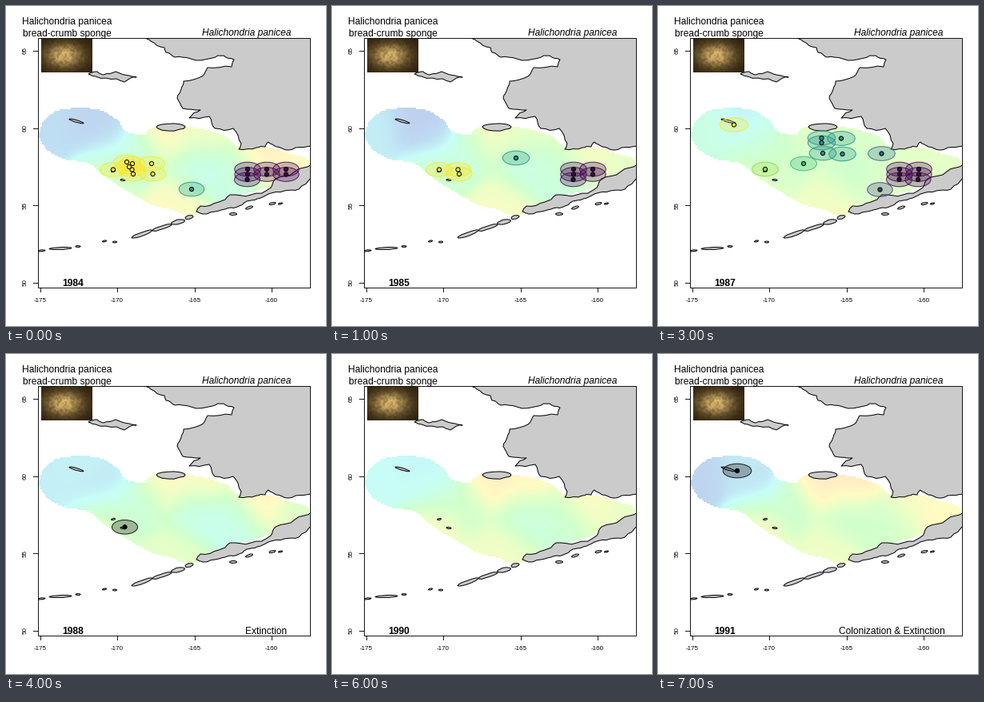
A matplotlib script that plays this animation: 400 by 400 pixels, repeating every 8 s.

```python
import matplotlib.pyplot as plt
import numpy as np
from matplotlib.animation import ArtistAnimation
from matplotlib.colors import to_rgb
from matplotlib.patches import Circle, Ellipse, Polygon, Rectangle
from matplotlib.path import Path

SIZE, PX = 400, 0.72  # stage in pixels, points per pixel
LEFT, TOP, RIGHT, BOTTOM = 39.5, 39.5, 380, 351.5
SCALE = 19.3  # pixels per degree

plt.rcParams["font.family"] = "Liberation Sans"
fig = plt.figure(figsize=(4, 4), dpi=100, facecolor="white")
ax = fig.add_axes([0, 0, 1, 1])
ax.axis("off")

# Coastlines in stage pixels; fine detail is added by roughen()
MAINLAND = [
    (172, 38), (181, 44), (198, 52), (200, 58), (211, 64), (231, 66),
    (258, 65), (272, 62), (285, 67), (282, 76), (252, 77), (245, 88),
    (222, 94), (219, 104), (214, 115), (221, 128), (243, 130), (229, 140),
    (254, 138), (261, 153), (284, 153), (294, 172), (291, 179), (313, 177),
    (324, 176), (328, 170), (338, 176), (352, 180), (362, 177), (382, 175),
    (382, 38),
]
PENINSULA = [
    (382, 198), (361, 207), (337, 216), (331, 227), (306, 236), (280, 236),
    (266, 245), (243, 250), (238, 257), (246, 260), (266, 256), (281, 252),
    (294, 249), (301, 244), (314, 241), (328, 235), (348, 231), (366, 229),
    (382, 214),
]
ST_LAWRENCE = [
    (103, 85), (114, 82), (122, 86), (137, 82), (154, 87), (163, 89),
    (148, 95), (138, 91), (112, 88),
]
# Small islands: centre, length, thickness and slope
ISLANDS = [
    (206, 151, 36, 10, 0), (88, 144, 18, 3, 0.28), (134, 206.5, 5, 2, -0.2),
    (146, 217.5, 6, 2, 0.1), (229, 264, 10, 5, -0.2), (215, 270, 17, 6, -0.2),
    (195, 277, 24, 5, -0.3), (170, 285, 26, 5, -0.35), (136, 295, 5, 2, 0),
    (123, 294, 5, 2, -0.2), (90, 300.5, 6, 2, 0), (68, 303, 28, 3, -0.04),
    (43, 306, 12, 2, -0.1), (333, 247, 8, 3, -0.2), (343, 247, 5, 2, -0.2),
    (304, 252, 9, 3, -0.3), (284, 260, 9, 3, 0),
]
SHELF = [
    (40, 162), (47, 142), (64, 130), (90, 127), (119, 129), (142, 144),
    (148, 157), (173, 163), (179, 152), (206, 150), (240, 152), (276, 162),
    (289, 177), (335, 177), (352, 184), (378, 190), (379, 202), (330, 227),
    (270, 242), (240, 260), (226, 263), (207, 254), (184, 250), (158, 235),
    (122, 213), (105, 196), (72, 192), (50, 180),
]

# Bottom temperature: stations, yearly levels and a pastel scale
STATIONS = np.array([
    (58, 150), (105, 138), (125, 170), (130, 208), (165, 188), (200, 163),
    (212, 245), (240, 200), (245, 163), (290, 207), (318, 183), (360, 197),
])
LEVELS = {
    1984: (1.1, 0.7, 0.9, 4.8, 3, 6.2, 5.9, 2.3, 5.6, 3, 7, 6),
    1986: (2, 0.2, 0.7, 3.6, 2.9, 5.2, 5.5, 2.9, 4.6, 3.6, 4.8, 4.2),
    1987: (2.9, 1.6, 2.9, 4.9, 4, 5, 5.5, 3.8, 4.6, 4.6, 5, 5),
    1988: (1.6, 1.7, 1.2, 4.9, 3.1, 6, 5, 2.2, 6, 2.5, 7, 4.6),
    1989: (3.4, 2.2, 2.9, 6, 4.2, 6.7, 5.5, 2.3, 5.7, 2.8, 6.4, 4.2),
    1991: (0.7, 1.5, 1, 5.9, 3.4, 7, 5.4, 3.7, 7.2, 4.1, 6, 6),
}
PASTELS = ["#bec5e8", "#bedcf3", "#c8fdf8", "#cbffe1", "#d1ffcd", "#e6ffc8",
           "#fffbc3", "#ffecc5", "#ffd6c6"]

# Clusters of sightings per year, from west to east
EAST = [(302, 204), (302, 210.5), (301.5, 217)]
NEAR = [(326, 204), (326, 210.5)]
PRIBILOF = [(134, 204.5), (157.5, 204.5), (159, 210)]
SIGHTINGS = {
    1984: [
        PRIBILOF + [(151, 195), (158, 197), (154, 201), (182, 197),
                    (183.5, 210)],
        [(232, 229)],
        EAST + NEAR + [(350, 204), (350, 210.5)],
    ],
    1985: [PRIBILOF, [(230, 190)], EAST + NEAR],
    1986: [
        [(74.5, 146), (75, 152)],
        [(182.5, 203.5)],
        [(230, 184), (230.5, 190.5)],
        [(278.5, 204), (278, 216), (277.5, 229)] + EAST,
        [(350, 204)],
    ],
    1987: [
        [(95, 148.5)],
        [(134, 204)],
        [(182, 197)],
        [(204.5, 165), (204.5, 171), (229, 165.5), (206, 184), (230.5, 185)],
        [(279.5, 184.5)],
        [(277.5, 229.5)],
        EAST + NEAR + [(325, 217)],
    ],
    1988: [[(148.5, 216.3)]],
    1991: [[(99, 146)]],
}
EVENTS = {1988: ("Extinction", 325), 1991: ("Colonization & Extinction", 292.5)}


def label(x, y, text, size=12, **style):
    style = {"ha": "center", "va": "baseline", **style}
    return ax.text(x, y, text, fontsize=size * PX, **style)


def line(xs, ys):
    ax.plot(xs, ys, color="black", lw=0.9 * PX, zorder=6)


def roughen(points, rng, rounds=2, amount=0.11):
    """Split every edge and push its middle sideways."""
    pts = np.array(points, float)
    for _ in range(rounds):
        edge = np.roll(pts, -1, axis=0) - pts
        side = np.column_stack([-edge[:, 1], edge[:, 0]])
        push = rng.uniform(-amount, amount, (len(pts), 1))
        push[np.hypot(*edge.T) > 60] = 0
        middle = pts + edge / 2 + side * push
        pts = np.stack([pts, middle], axis=1).reshape(-1, 2)
    return pts


def island(x, y, length, thick, slope, rng):
    a = np.linspace(0, 2 * np.pi, 14, endpoint=False)
    r = rng.uniform(0.75, 1.1, a.size)
    dx = length / 2 * np.cos(a)
    return np.column_stack([x + dx, y + slope * dx + thick / 2 * r * np.sin(a)])


def smooth(points, rounds=2):
    """Cut corners of a closed outline."""
    pts = np.array(points, float)
    for _ in range(rounds):
        nxt = np.roll(pts, -1, axis=0)
        pts = np.stack([0.8 * pts + 0.2 * nxt, 0.2 * pts + 0.8 * nxt], axis=1)
        pts = pts.reshape(-1, 2)
    return pts


def draw_land():
    rng = np.random.default_rng(7)
    frame = Rectangle((LEFT, TOP), RIGHT - LEFT, BOTTOM - TOP, fill=False,
                      ec="black", lw=0.9 * PX, zorder=6)
    ax.add_patch(frame)
    shapes = [roughen(p, rng) for p in (MAINLAND, PENINSULA, ST_LAWRENCE)]
    shapes += [island(*row, rng) for row in ISLANDS]
    for shape in shapes:
        land = Polygon(shape, fc="#cbcbcb", ec="black", lw=PX,
                       joinstyle="round", zorder=2)
        ax.add_patch(land)
        land.set_clip_path(frame)


def draw_axes():
    for lon in range(-175, -159, 5):
        x = 42.5 + (lon + 175) * SCALE
        line([x, x], [BOTTOM, BOTTOM + 5.5])
        label(x, 369.5, str(lon), 8)
    for lat in range(50, 66, 5):
        y = 152.5 + (60 - lat) * SCALE
        line([LEFT - 5.5, LEFT], [y, y])
        label(24.2, y, str(lat), 8, rotation=90, va="center")


def draw_photo():
    rng = np.random.default_rng(4)
    y, x = np.mgrid[-1:1:21j, -1:1:32j]
    glow = np.exp(-1.9 * ((x + 0.1) ** 2 + y ** 2))
    glow = np.clip(glow * rng.uniform(0.6, 1.15, glow.shape), 0, 1)[..., None]
    dark, gold = np.array(to_rgb("#2e210e")), np.array(to_rgb("#e2bc70"))
    ax.imshow(dark + (gold - dark) * glow, extent=(44, 108, 83, 41),
              interpolation="bilinear", aspect="auto", zorder=3)


gx, gy = np.meshgrid(np.arange(40, 381, 2), np.arange(126, 267, 2))
cells = np.column_stack([gx.ravel(), gy.ravel()])
on_shelf = Path(smooth(SHELF)).contains_points(cells).reshape(gx.shape)
dist2 = ((cells[:, None] - STATIONS) ** 2).sum(axis=2)
weights = np.exp(-dist2 / (2 * 20 ** 2)) + 1e-9
weights /= weights.sum(axis=1, keepdims=True)
scale_rgb = np.array([to_rgb(c) for c in PASTELS])


def temperature(year):
    known = sorted(LEVELS)
    values = [np.interp(year, known, column)
              for column in zip(*(LEVELS[k] for k in known))]
    level = (weights @ np.array(values)).reshape(gx.shape)
    rgb = [np.interp(level, np.arange(len(scale_rgb)), channel)
           for channel in scale_rgb.T]
    return ax.imshow(np.dstack([*rgb, on_shelf]), extent=(39, 381, 267, 125),
                     interpolation="nearest", aspect="auto", zorder=1)


def sightings(year):
    clusters = SIGHTINGS.get(year, [])
    artists = []
    for i, cluster in enumerate(clusters):
        if len(clusters) == 1:
            color = (0, 0, 0)
        else:
            color = plt.cm.viridis(1 - i / (len(clusters) - 1))[:3]
        for x, y in cluster:
            lat = 60 + (152.5 - y) / SCALE
            height = 17.6
            width = height / np.cos(np.radians(lat))
            artists.append(Ellipse((x, y), width, height, fc=(*color, 0.27),
                                   ec=(*color, 0.85), lw=PX, zorder=4))
        for x, y in cluster:
            artists.append(Circle((x, y), 2.6, fc=color, ec="black",
                                  lw=PX, zorder=5))
    for artist in artists:
        ax.add_patch(artist)
    return artists


def scene(year):
    artists = [temperature(year), *sightings(year)]
    artists.append(label(84, 350, str(year), weight="bold", zorder=7))
    if year in EVENTS:
        text, x = EVENTS[year]
        artists.append(label(x, 350, text, zorder=7))
    return artists


draw_land()
draw_axes()
draw_photo()
label(76, 23.3, "Halichondria panicea", zorder=7)
label(76, 37.8, "bread-crumb sponge", zorder=7)
label(301, 37.2, "Halichondria panicea", style="italic", zorder=7)
scenes = [scene(year) for year in range(1984, 1992)]
ax.set_xlim(0, SIZE)
ax.set_ylim(SIZE, 0)

anim = ArtistAnimation(fig, scenes, interval=1000, repeat=True, repeat_delay=0)
plt.show()
```
